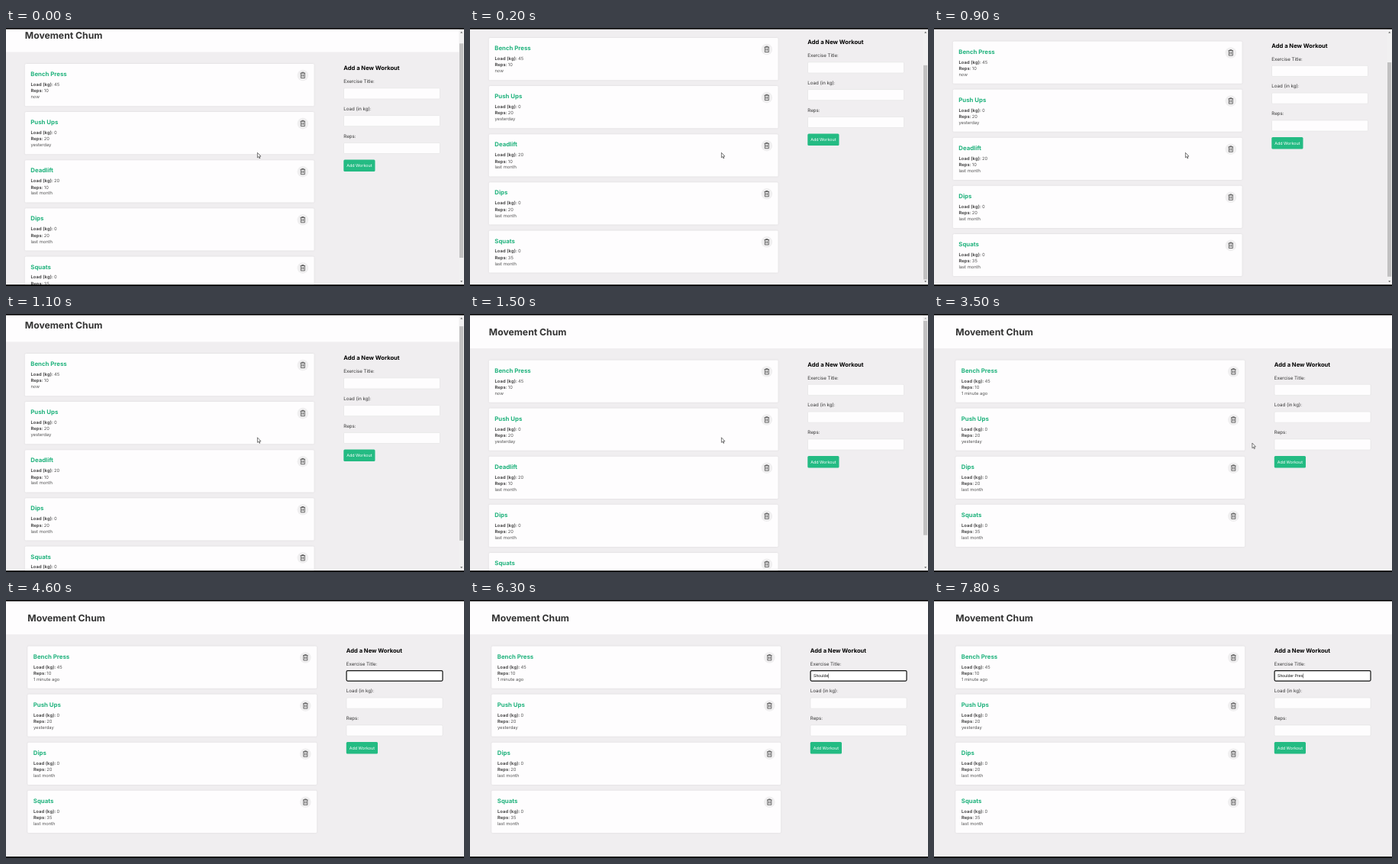
An HTML page that plays this animation: 600x338 px, repeating every 8000 ms.

```html
<!DOCTYPE html>
<html lang="en">
<head>
<meta charset="utf-8">
<title>Workout list</title>
<style>
  html, body { margin: 0; width: 100%; height: 100%; overflow: hidden; background: #f0eef0; }
  svg { display: block; width: 100%; height: 100%; }
  text { font-family: Inter, "Open Sans", sans-serif; text-rendering: geometricPrecision; white-space: pre; }
  .title { font-size: 12.2px; font-weight: 700; fill: #333; }
  .name { font-size: 7.8px; font-weight: 700; fill: #1fb27c; }
  .info { font-size: 5.8px; fill: #555; }
  .key { font-size: 5.8px; font-weight: 600; fill: #333; letter-spacing: .12px; }
  .head { font-size: 7.6px; font-weight: 700; fill: #000; }
  .label { font-size: 6.15px; fill: #333; }
  .action { font-size: 5.4px; fill: #fff; }
  .typed { font-family: "Liberation Sans", Arial, sans-serif; font-size: 5.3px; fill: #111; }
  .card { fill: #fefdfe; filter: drop-shadow(.6px .6px .8px rgba(0, 0, 0, .09)); }
</style>
</head>
<body>
<svg id="stage" viewBox="0 0 600 338" preserveAspectRatio="none"></svg>
<script>
const LOOP = 8000, STEP = 100;
const FOCUS_AT = 4100, DELETE_AT = 2800;
const CARD_TOP = 60.5, CARD_STEP = 63.1, FIELD_STEP = 35.8;
const stage = document.getElementById("stage");

function add(parent, tag, attrs = {}, text) {
  const node = document.createElementNS("http://www.w3.org/2000/svg", tag);
  for (const key in attrs) node.setAttribute(key, attrs[key]);
  if (text !== undefined) node.textContent = text;
  parent.append(node);
  return node;
}
const group = parent => add(parent, "g");
const rect = (parent, x, y, width, height, attrs) => add(parent, "rect", { x, y, width, height, ...attrs });
const label = (parent, cls, x, y, text) => add(parent, "text", { class: cls, x, y }, text);
const path = (parent, d, attrs) => add(parent, "path", { d, ...attrs });
const show = (node, on) => node.setAttribute("visibility", on ? "visible" : "hidden");
const move = (node, x, y) => node.setAttribute("transform", `translate(${x} ${y})`);

// Linear interpolation through [time, value...] keys
function track(keys, t) {
  let i = keys.findIndex(k => k[0] > t);
  if (i < 0) return keys[keys.length - 1].slice(1);
  if (i === 0) return keys[0].slice(1);
  const [a, b] = [keys[i - 1], keys[i]];
  const p = (t - a[0]) / (b[0] - a[0]);
  return a.slice(1).map((v, n) => v + (b[n + 1] - v) * p);
}
// Latest [time, value] entry reached
const latest = (keys, t) => keys.reduce((v, k) => (k[0] <= t ? k[1] : v), keys[0][1]);

const scrollKeys = [[0, 13.5], [100, 36], [200, 47.5], [800, 47.5], [900, 43],
  [1000, 22], [1100, 8.5], [1200, 2.5], [1300, 0]];
const pointerKeys = [[0, 329.4, 163.3], [1000, 329.4, 163.3], [1100, 329.4, 161.8],
  [1700, 329.4, 161.8], [2100, 366, 186], [2400, 388.8, 198.2], [3300, 388.8, 198.2],
  [3700, 445, 140], [4000, 484, 102], [4100, 489, 99]];
const typedKeys = [[0, ""], [5200, "S"], [5400, "Sh"], [5700, "Sho"], [6000, "Shou"],
  [6100, "Shoul"], [6300, "Shoulde"], [6500, "Shoulder"], [6700, "Shoulder "],
  [7300, "Shoulder P"], [7500, "Shoulder Pr"], [7600, "Shoulder Pre"], [7800, "Shoulder Pres"]];
const workouts = [
  ["Bench Press", 45, 10, "now"],
  ["Push Ups", 0, 20, "yesterday"],
  ["Deadlift", 20, 10, "last month"],
  ["Dips", 0, 20, "last month"],
  ["Squats", 0, 35, "last month"],
];
const DELETED = 2;

rect(stage, 0, 0, 600, 338, { fill: "#f0eef0" });
const page = group(stage);
rect(page, -10, -10, 620, 55, { fill: "#fefdfe" });
label(page, "title", 24.8, 27.6, "Movement Chum");

function makeCard([name, load, reps, date]) {
  const g = group(page);
  rect(g, 24.8, 0, 378.8, 55.2, { class: "card", rx: 1.5 });
  label(g, "name", 32.3, 16.2, name);
  label(g, "key", 32.4, 29, "Load (kg):");
  label(g, "info", 62.9, 29, load);
  label(g, "key", 32.4, 37.4, "Reps:");
  label(g, "info", 49.8, 37.4, reps);
  const when = label(g, "info", 32.4, 45.3, date);
  const bin = group(g);
  move(bin, 388.8, 15);
  add(bin, "circle", { r: 7.3, fill: "#f0eff0" });
  path(bin, "M-3.2-2.9H3.2M-1.2-2.9V-3.8H1.2V-2.9M-2.5-2.9V3.5H2.5V-2.9M-.9-1.2V1.8M.9-1.2V1.8",
    { fill: "none", stroke: "#3c3c3c", "stroke-width": .75 });
  return { g, when };
}
const cards = workouts.map(makeCard);

label(page, "head", 442.3, 68.6, "Add a New Workout");
["Exercise Title:", "Load (in kg):", "Reps:"].forEach((text, i) => {
  const y = i * FIELD_STEP;
  label(page, "label", 442.3, 85.6 + y, text);
  rect(page, 442.5, 92.3 + y, 126, 14.1, { fill: "#fefdfe", stroke: "#dddcdd", "stroke-width": .5, rx: 1.3 });
});
const focus = rect(page, 442.6, 92.6, 125.9, 13.5, { fill: "#fff", stroke: "#111", "stroke-width": 1.2, rx: 1.5 });
const typed = label(page, "typed", 446.4, 101.2, "");
const caret = rect(page, 0, 96.4, .5, 6, { fill: "#111" });
rect(page, 442.3, 186, 41.2, 15.6, { fill: "#24bb83", rx: 1.5 });
label(page, "action", 446.2, 195.7, "Add Workout");

const bar = group(stage);
rect(bar, 593.4, 0, 6.6, 338, { fill: "#f1f0f1" });
const thumb = rect(bar, 594, 9, 5.2, 280.7, { fill: "#c1c0c1" });
const upArrow = path(bar, "M595.2 6.5l1.5-1.8 1.5 1.8z");
path(bar, "M595.2 331.3l1.5 1.8 1.5-1.8z", { fill: "#505050" });

const pointer = group(stage);
const outline = { fill: "#fff", stroke: "#222", "stroke-width": .6, "stroke-linejoin": "round" };
const arrow = path(pointer, "M0 0V6.6L1.5 5.2 2.5 7.5 3.5 7.1 2.5 4.8H4.5Z", outline);
const hand = path(pointer,
  "M-.8.8Q0-.4.8.8V3.6L3.4 4.2Q4.2 4.5 4.1 5.4L3.5 9H-.4L-2.6 5.8Q-2.8 4.8-1.8 5L-.8 5.8Z", outline);
const beam = path(pointer, "M-1-3H1M0-3V3M-1 3H1", { fill: "none", stroke: "#333", "stroke-width": .5 });

rect(stage, 0, 0, 600, 1.6, { fill: "#000" });
rect(stage, 0, 336.2, 600, 1.8, { fill: "#000" });

function draw(time) {
  const t = Math.floor(time / STEP) * STEP;
  const deleted = t >= DELETE_AT;
  const [scroll] = track(scrollKeys, t);
  move(page, deleted ? 3.5 : 0, -scroll);

  cards.forEach(({ g }, i) => {
    const row = deleted && i > DELETED ? i - 1 : i;
    move(g, 0, CARD_TOP + row * CARD_STEP);
    show(g, !(deleted && i === DELETED));
  });
  cards[0].when.textContent = deleted ? "1 minute ago" : workouts[0][3];

  show(bar, !deleted);
  thumb.setAttribute("y", 9 + scroll * .838);
  upArrow.setAttribute("fill", scroll > 0 ? "#505050" : "#a5a5a5");

  const text = latest(typedKeys, t);
  typed.textContent = text;
  caret.setAttribute("x", 446.5 + (text ? typed.getComputedTextLength() : 0));
  show(focus, t >= FOCUS_AT);
  show(caret, t >= FOCUS_AT && !(t >= 4600 && t < 4900));

  const [x, y] = track(pointerKeys, t);
  move(pointer, x, y);
  const overBin = t >= 2300 && t < 3400;
  const overField = t >= 4000;
  show(arrow, !overBin && !overField);
  show(hand, overBin);
  show(beam, overField && t < 4600);
}

const start = performance.now();
function tick() {
  draw((performance.now() - start) % LOOP);
  requestAnimationFrame(tick);
}
tick();
</script>
</body>
</html>
```
